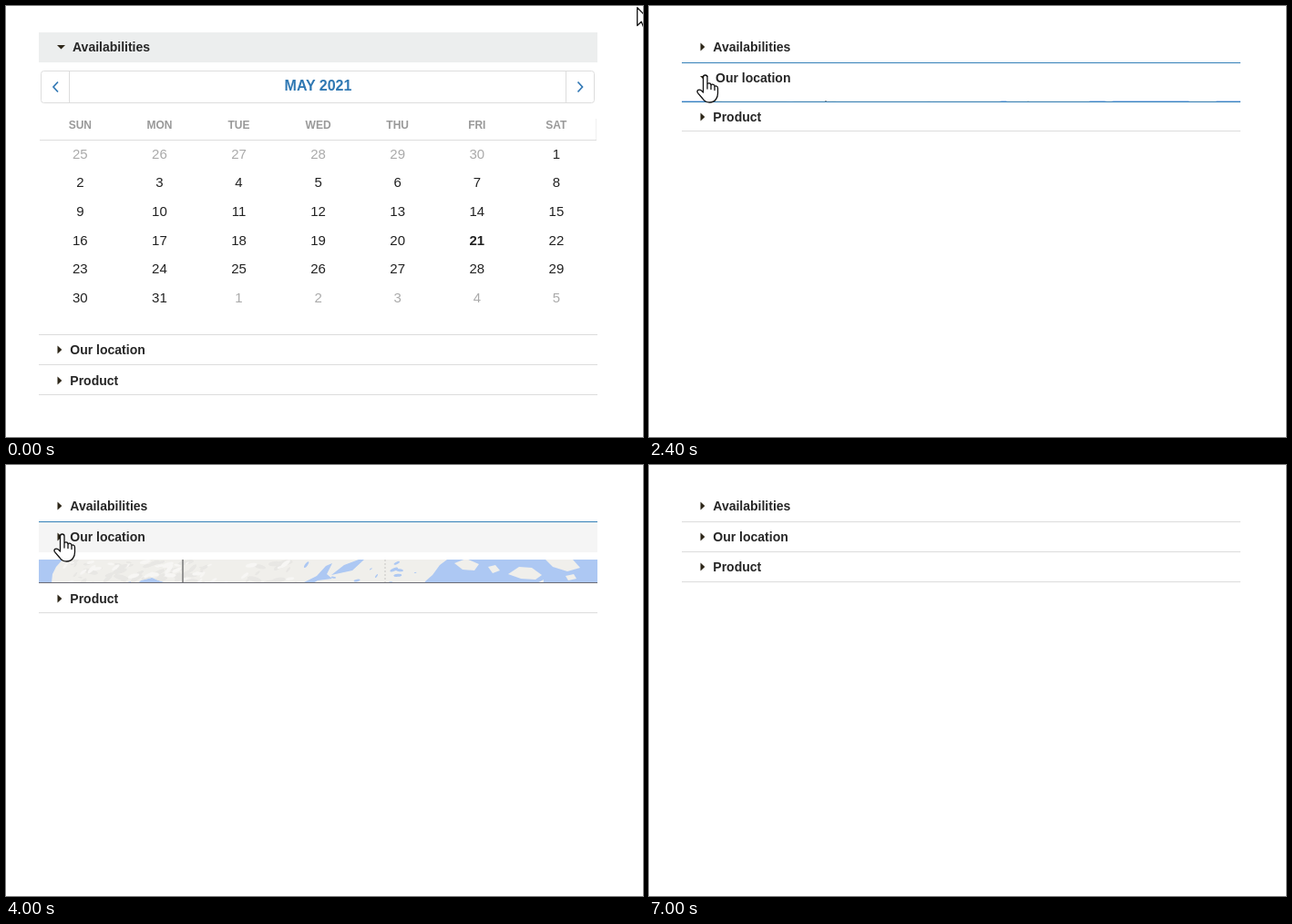
An HTML page that plays this animation: 699x474 px, repeating every 7270 ms.

```html
<!DOCTYPE html>
<html lang="en">
<head>
<meta charset="utf-8">
<title>Accordion</title>
<style>
  html, body { margin: 0; width: 100%; height: 100%; overflow: hidden; background: #fff; }
  svg { display: block; }
  text { font-family: "Liberation Sans", Arial, sans-serif; }
  .head { font-weight: 700; font-size: 14px; fill: #262626; }
  .mid { text-anchor: middle; }
  .place { font-family: "Open Sans", sans-serif; font-size: 10.7px; fill: #4170c2; text-anchor: middle; }
  .land { font-family: "Open Sans", sans-serif; font-size: 12.7px; font-weight: 700; fill: #111;
          text-anchor: middle; stroke: #fff; stroke-width: 2.5px; paint-order: stroke; }
</style>
</head>
<body>
<svg id="stage" width="699" height="474" viewBox="0 0 699 474">
  <defs>
    <clipPath id="clip0"><rect x="36" y="62" width="613"/></clipPath>
    <clipPath id="clip1"><rect x="36" y="95" width="613"/></clipPath>
    <clipPath id="clip2"><rect x="36" y="128" width="613"/></clipPath>
    <clipPath id="mapBox"><rect x="36" y="104" width="613" height="322"/></clipPath>
    <clipPath id="coast"><use href="#mainland"/></clipPath>
    <filter id="soft" x="-20%" y="-50%" width="140%" height="200%"><feGaussianBlur stdDeviation="3"/></filter>
    <linearGradient id="metal" x2="1" y2="0"><stop stop-color="#aeb2b3"/><stop offset=".5" stop-color="#f1f2f2"/><stop offset="1" stop-color="#c3c6c7"/></linearGradient>
    <linearGradient id="shell" x2="0" y2="1"><stop stop-color="#f0f0f1"/><stop offset="1" stop-color="#e3e4e6"/></linearGradient>
  </defs>

  <g id="bars"></g>
  <g clip-path="url(#clip0)" id="calendar"></g>

  <g clip-path="url(#clip1)"><g clip-path="url(#mapBox)">
    <rect x="36" y="104" width="613" height="322" fill="#adc8f3"/>
    <path id="mainland" fill="#f0efeb" d="M62 104L55 112 51 120 50 129 59 134 62 143 76 141 88 139 84 148 97 150 93 160 78 172 64 185 55 194 64 192 82 180 99 168 110 158 113 149 124 141 130 130 137 128 135 139 148 127 160 124 173 129 187 136 195 141 205 149 213 160 221 174 229 183 235 198 248 203 257 219 265 234 279 243 296 251 297 259 288 257 290 271 291 290 288 309 292 329 304 349 317 365 329 376 334 388 343 403 352 415 357 426H372L361 409 349 396 343 386 357 400 373 414 381 426H440L443 417 455 408 470 405 486 408 500 409 498 403 512 400 522 402 527 412 533 424 540 426 541 414 536 400 531 388 536 375 549 362 565 349 562 335 567 322 579 313 591 308 593 301 602 302 602 294 612 287 625 280 620 293 648 280 649 104Z"/>
    <g clip-path="url(#coast)">
      <g id="relief"></g>
      <g id="lakes" fill="#adc8f3"></g>
    </g>
    <g fill="#adc8f3">
      <path d="M484 104L476 110 468 121 460 128 456 143 457 154 473 166 490 179 509 189 525 191 529 207 536 221 544 232 549 217 545 201 557 191 563 178 559 160 553 148 551 137 566 131 579 132 590 126 588 146 597 155 606 148 611 137 625 132 634 142 641 136 649 152V104Z"/>
      <path d="M649 186L641 178 636 186 644 194 649 193ZM588 277L600 266 611 255 626 246 649 240V268L632 271 618 266 607 265 599 272Z"/>
      <path d="M468 269L477 258 491 252 505 255 512 267 499 266 491 271 480 268ZM497 309L496 290 502 276 511 273 508 286 510 302 503 311ZM511 273L526 276 540 288 536 296 527 290 524 305 518 300 520 286ZM522 309L533 302 548 298 543 304 527 311ZM546 296L555 289 568 288 562 295Z"/>
      <path d="M418 209L425 206 429 219 437 225 442 240 434 236 426 225ZM432 196l9 11 1 10-7-10ZM323 131L341 122 351 111 358 108 352 120 358 125 342 127 330 134ZM357 121l14-11 16-6h6l-13 12ZM353 310l5 8-4 3ZM213 165l9 5 8 17 8 9 11 5-13 1-12-14ZM254 207l20 28 17 11-8 4-18-15Z"/>
    </g>
    <g fill="#f0efeb">
      <path d="M492 108l13-5 14 6-5 7-13-1ZM551 120l12-8 14 1 11 8-7 5-16-1ZM592 104h30l8 9-14 4-16-5ZM529 112l8-2 5 6-8 3ZM614 122l9-2 3 5-9 2ZM619 256l13-5 6 3-10 5ZM627 284l15-10 7-2v9l-20 9ZM237 198l10-5 6 4-7 6ZM224 181l6-4 9 12-5 2ZM268 235l6-1 17 14-4 3Z"/>
      <path d="M102 178l8-5 4 3-9 7ZM44 207l7-5 2 2-8 6ZM36 211l5-2v3l-5 2ZM44 160l6-2 3 3-7 3ZM240 208l4 2 4 11-4-2Z"/>
    </g>
    <path id="states" fill="none" stroke="#c7c6c4" stroke-dasharray="2 2" d="M194 142H456M313 142V251M363 196V251M416 104V251M313 142l50 54M233 142l14 27M416 222l57-36M456 251V231l18-18M545 232l20 18 3 35M313 251l-1 29 5 10M290 269l25 4M288 308h76M317 282v26M330 251l8 20 12 8 8 16M358 295h20M378 251v95M378 278h53M404 251v76M363 278v67M349 308v34l-9 31M349 345h100M382 345v37M364 308h15M431 251l4 52 13 7M404 302h32M404 327h47M448 310l4 37 4 31M419 345v16l33 8M442 289h34M470 259l-7 15 15 23-7 16 11 20-5 16M450 319h29M451 347h27M456 378h21l-4 27M478 345l-8 25M497 311v28M478 345l49-4M485 344v62M503 344l4 38M485 383h24l22 5M514 311v22M514 343l19 21M527 341l36-2M516 324l20 13 13-9M532 309v16h34M548 303l21-2M568 287l9 14 2 12M577 287v15l14 4M587 284v18M592 275l8 20"/>
    <g fill="none" stroke="#8b8b8b" stroke-width="1.8" stroke-linejoin="round">
      <path d="M194 104V139L204 144 206 150 216 153 219 147 226 147 231 158 239 168 246 179 256 185 256 195 251 199 235 200"/>
      <path d="M285 255L295 258 296 251H455L457 247 460 253 470 258 485 259 496 258 511 268 522 277 526 287 528 295 523 309 533 306 546 302 548 296 563 292 570 286 586 285 590 274 598 273 602 265 609 266 611 279 615 285 613 297"/>
      <path d="M329 376H343L358 383H379V380H390L398 391 403 394 409 388 416 395 422 407 431 416 443 419"/>
    </g>
    <g class="place">
      <text x="170" y="153">Gulf</text><text x="166.500" y="165">of Alaska</text>
      <text x="508" y="153">Hudson Bay</text>
      <text x="480" y="421">Gulf of</text><text x="480" y="433">Mexico</text>
    </g>
    <text class="land" x="412" y="172">CANADA</text>
    <text class="land" x="425.500" y="328">UNITED STATES</text>
  </g></g>

  <g clip-path="url(#clip2)">
    <path filter="url(#soft)" fill="#b9b9b9" d="M62 348L82 379 255 372 436 366V356Z"/>
    <path fill="#292e2e" d="M65 324L194 334 434 329V362L302 365 255 367 82 377 65 348Z"/>
    <path fill="#1d2121" d="M65 324L82 340V377L65 348ZM253 360l49-3v6l-49 4Z"/>
    <path stroke="#d8d8d8" stroke-width="2" d="M132.500 360v9"/>
    <path fill="#383d3d" d="M198 168l22-8 14 2v32h-36Z"/>
    <path fill="url(#metal)" d="M163 174q2-5 9-5l25 2q5 8 3 21l-37-3Z"/>
    <path fill="#d9dbdb" d="M195 179l30 2v12h-30Z"/>
    <path fill="#303535" d="M232 155L256 152 274 156V197L226 193 229 177Z"/>
    <path fill="#454b4b" d="M232 155l24-3v21l-24 5Z"/>
    <path fill="#d33a2d" d="M239 175.500l24-1v10.500l-24 1Z"/>
    <path fill="#b9bcbf" d="M67 212L86 185V340L67 325Z"/>
    <path fill="#303536" d="M72 215l9-7v95l-9 4Z"/><path fill="#596063" d="M74 220l5-4v77l-5 2Z"/>
    <path fill="url(#shell)" d="M84 189L194 193V335L82 340Z"/>
    <path fill="#fafafa" d="M84 189L91 184 180 187 206 192 194 196Z"/>
    <path fill="#e6e7e9" d="M193 312L352 310V332L193 335Z"/>
    <path fill="url(#shell)" d="M346 200L434 206V330L351 331Z"/>
    <path fill="#f9f9f9" d="M342 197L372 190 410 192 434 207 346 203Z"/>
    <path fill="#303535" d="M193 198L205 191 346 198 351 310 194 313Z"/>
    <path fill="#434949" d="M193 198l12-7 141 7 1 4Z"/>
    <path fill="#aeb4b6" d="M215 217l41 2v62l-41 2Z"/>
    <path fill="#dfe2e2" d="M217 238l25-4v44l-25 3Z"/>
    <path fill="none" stroke="#a2a8aa" d="M217 248l26-2M217 263l26-1"/>
    <path fill="#272c2d" d="M217 219l38 2v12l-6 2-1 8-6-1-2-8-22-2Z"/>
    <path fill="#c8d0d3" d="M295 220l36 1v58l-36 2Z"/>
    <path fill="#e6eaeb" d="M298 222l24 1v55l-24 1Z"/>
    <path stroke="#90989b" d="M324.500 222v57"/>
    <path stroke="#151919" d="M272.500 195v116"/>
    <path stroke="#c2c7c7" stroke-width="2.500" d="M274.500 222v56M280.500 222v56"/>
    <path fill="#eeeeef" stroke="#c5c8c9" stroke-width=".7" d="M323 190L366 178 379 182V229H369L368 190 336 195Z"/>
    <path stroke="#999" stroke-width="4" d="M369.500 172v8"/>
    <path fill="#c9342b" d="M366 150q3.500-3 6 0v8h-6Z"/><path fill="#e8aa42" d="M366 158h6v6h-6Z"/><path fill="#3d8062" d="M366 164h6v8h-6Z"/>
    <path fill="#e0e2e4" stroke="#b6b9ba" stroke-width=".7" d="M349 227l54 1 1 20 6 23v10l-58 2Z"/>
    <path fill="#35393d" d="M352 230l49 1v16l-48-1Z"/>
    <path fill="#8ca0aa" d="M356 233h19v10h-19Z"/><path fill="#64686b" d="M380 234h16v9h-16Z"/>
    <path fill="#2c3032" d="M351 249l54 1 4 19-57 3Z"/>
    <path stroke="#969d9f" stroke-width="2" stroke-dasharray="2 3" d="M355 254h34M355 259h33M355 264h34"/>
    <circle cx="396" cy="257" r="2.500" fill="#d13d30"/><circle cx="402" cy="263" r="2" fill="#eee"/>
    <path fill="#c4c7ca" d="M364 283h20v23h-20Z"/>
    <path fill="none" stroke="#33383a" stroke-width="2" d="M403 281V314q0 9-4 9t-3-7V288"/>
    <path fill="#cb3235" stroke="#fff" d="M117 221h48v15h-48Z"/>
    <rect x="117" y="236" width="48" height="14" fill="#244d91"/>
    <text class="mid" x="141" y="233" font-size="11" font-weight="700" fill="#fff">VQ-2730</text>
  </g>

  <g id="cursor" stroke="#111" stroke-width="1.300" fill="#fff" stroke-linejoin="round">
    <path id="arrow" d="M.7.7V20.500L5.200 16.300 8.600 24.500 12 23 8.600 15H14.700Z"/>
    <path id="hand" d="M7.500 20V3.200Q7.500 1 9.700 1 12 1 12 3.200V16 11Q12.300 9.700 14 9.800 16 10 16 12V16.500 12.500Q16.300 11 18 11.200 20 11.500 20 13.500V17.500 14Q20.300 12.700 21.800 13 23.500 13.500 23.500 15.500V21Q23.500 25 21.500 27.500 19 31 14.500 31 9.500 31 7 27L1.300 20.300Q.4 18.300 2 17.300 3.800 16.600 5.500 18Z"/>
  </g>
</svg>
<script>
const LOOP = 7270, TICK = 1000 / 15;
const GREY = '#dcdcdc', DARK = '#6b6b74', BLUE = '#3380b8';
const $ = id => document.getElementById(id);

function add(parent, tag, attrs, text) {
  const el = document.createElementNS('http://www.w3.org/2000/svg', tag);
  for (const k in attrs) el.setAttribute(k, attrs[k]);
  if (text !== undefined) el.textContent = text;
  parent.appendChild(el);
  return el;
}

function buildCalendar() {
  const g = $('calendar');
  const colX = i => 81.300 + 87.100 * i;
  add(g, 'rect', { x: 38.5, y: 71.5, width: 607, height: 35, rx: 3, fill: 'none', stroke: '#ddd' });
  add(g, 'path', { d: 'M69.5 72V106M614.5 72V106M37 147.5H648', stroke: '#ddd' });
  add(g, 'path', { d: 'M647.5 124V147', stroke: '#f0f0f0' });
  add(g, 'path', { d: 'M57 83.5L52 89 57 94.500M627.500 83.500L632.500 89 627.500 94.500', fill: 'none', stroke: '#3379b5', 'stroke-width': 1.7 });
  add(g, 'text', { x: 342.5, y: 93, class: 'mid', 'font-size': 16, 'font-weight': 700, fill: '#2f78b3' }, 'MAY 2021');
  'SUN MON TUE WED THU FRI SAT'.split(' ').forEach((d, i) =>
    add(g, 'text', { x: colX(i), y: 135, class: 'mid', 'font-size': 12, 'font-weight': 700, fill: '#999' }, d));
  for (let i = 0; i < 42; i++) {
    const date = new Date(2021, 3, 25 + i), inMonth = date.getMonth() === 4, day = date.getDate();
    add(g, 'text', {
      x: colX(i % 7), y: Math.round(167.700 + 31.600 * Math.floor(i / 7)), class: 'mid', 'font-size': 15,
      'font-weight': inMonth && day === 21 ? 700 : 400, fill: inMonth ? '#222' : '#aaa'
    }, day);
  }
}

// Seeded scatter for hills and small lakes
function buildTerrain() {
  let seed = 7;
  const rnd = () => (seed = seed * 16807 % 2147483647) / 2147483647;
  const scatter = (g, n, x, y, w, h, size, fill) => {
    for (let i = 0; i < n; i++) {
      const cx = x + rnd() * w, cy = y + rnd() * h, rx = size * (.4 + rnd());
      add(g, 'ellipse', { cx, cy, rx, ry: rx * .35, transform: `rotate(${-55 + rnd() * 70} ${cx} ${cy})`, ...(fill && { fill }) });
    }
  };
  const hills = [[70, 65, 106, 140, 36], [90, 200, 106, 115, 125], [70, 290, 250, 80, 120], [30, 350, 370, 65, 55], [20, 535, 300, 40, 60]];
  for (const [n, x, y, w, h] of hills) {
    scatter($('relief'), n, x, y, w, h, 6, '#e8e7e4');
    scatter($('relief'), n >> 1, x, y, w, h, 5, '#f7f6f4');
  }
  scatter($('lakes'), 26, 315, 106, 135, 100, 3.2);
  scatter($('lakes'), 14, 400, 106, 60, 50, 3.5);
  scatter($('lakes'), 24, 560, 150, 85, 95, 3);
  scatter($('lakes'), 14, 440, 205, 90, 45, 2.2);
}

const bars = ['Availabilities', 'Our location', 'Product'].map(label => {
  const g = add($('bars'), 'g', {});
  return {
    back: add(g, 'rect', { x: 36, width: 613, height: 33 }),
    icon: add(g, 'path', { fill: '#2d2618' }),
    text: add(g, 'text', { class: 'head' }, label)
  };
});
const lines = [0, 1, 2].map(() => add($('stage'), 'rect', { x: 36, width: 613, height: 1 }));
$('stage').appendChild($('cursor'));
const clips = [0, 1, 2].map(i => document.querySelector(`#clip${i} rect`));

// Panels: full height, slide start times, ticks at which the header opens, is pressed, closes and clears
const panels = [
  { full: 299.400, open: -999, close: 1230, ticks: [0, 0, 19, 24] },
  { full: 331, open: 2367, close: 3762.5, ticks: [34, 55, 57, 62] },
  { full: 286.500, open: 4630, close: 6093, ticks: [69, 90, 92, 97] }
];
const lineSteps = [
  [[0, GREY], [19, DARK], [34, BLUE], [68, GREY]],
  [[0, GREY], [34, BLUE], [57, DARK], [105, GREY]],
  [[0, GREY], [68, BLUE], [92, DARK], [105, GREY]]
];
// tick, x, y, shape
const moves = [
  [0, 692, 1, 'arrow'], [1, 540, 9, 'arrow'], [2, 310, 22, 'arrow'], [3, 140, 34, 'arrow'], [4, 54, 41, 'arrow'],
  [5, 28, 43, 'arrow'], [8, 42, 38, 'arrow'], [9, 50, 46, 'hand'], [12, 53, 46, 'hand'], [13, 55, 46, 'hand'],
  [28, 55, 49, 'hand'], [29, 54, 57, 'hand'], [30, 53, 66, 'hand'], [31, 52, 73, 'hand'], [32, 52, 75, 'hand'],
  [62, 52, 84, 'hand'], [63, 52, 102, 'hand'], [64, 52, 113, 'hand'],
  [97, 53, 150, 'arrow'], [98, 55, 240, 'arrow'], [99, 57, 345, 'arrow'], [100, 57, 421, 'arrow'],
  [101, 61, 442, 'arrow'], [102, 0, 0, '']
];

const at = (steps, n) => steps.findLast(s => s[0] <= n);
const swing = t => .5 - Math.cos(Math.PI * Math.min(1, Math.max(0, t))) / 2;

function draw(time) {
  const n = Math.floor((time + 4) / TICK), t = n * TICK;
  const heights = panels.map(p => p.full * (swing((t - p.open) / 300) - swing((t - p.close) / 300)));
  const y2 = 62.200 + heights[0], y3 = y2 + 33.400 + heights[1], y4 = y3 + 32.400 + heights[2];
  const tops = [28.300, y2, y3], edges = [y2, y3, y4].map(Math.floor);

  bars.forEach((bar, i) => {
    const [opens, pressed, closes, clears] = panels[i].ticks;
    const open = n >= opens && n < closes, y = Math.round(tops[i] + 16.700);
    bar.back.setAttribute('y', Math.floor(tops[i]) + 1);
    bar.back.setAttribute('fill', n < pressed || n >= clears ? '#fff' : n < closes ? '#eceeee' : '#f5f5f5');
    bar.icon.setAttribute('d', open ? `M56 ${y - 2}h9l-4.500 4.500Z` : `M56.500 ${y - 4.500}v9l4.800-4.500Z`);
    bar.text.setAttribute('x', open ? 73 : 70.300);
    bar.text.setAttribute('y', y + 5);
  });
  lines.forEach((line, i) => {
    line.setAttribute('y', edges[i]);
    line.setAttribute('fill', at(lineSteps[i], n)[1]);
    const top = +clips[i].getAttribute('y');
    clips[i].setAttribute('height', heights[i] < .5 ? 0 : Math.max(0, edges[i] - top));
  });

  const [, x, y, shape] = at(moves, n);
  $('cursor').setAttribute('transform', `translate(${x} ${y})`);
  for (const id of ['arrow', 'hand']) $(id).style.display = id === shape ? '' : 'none';
}

function loop() {
  draw((performance.now() - start) % LOOP);
  requestAnimationFrame(loop);
}

buildCalendar();
buildTerrain();
const start = performance.now();
loop();
</script>
</body>
</html>
```
